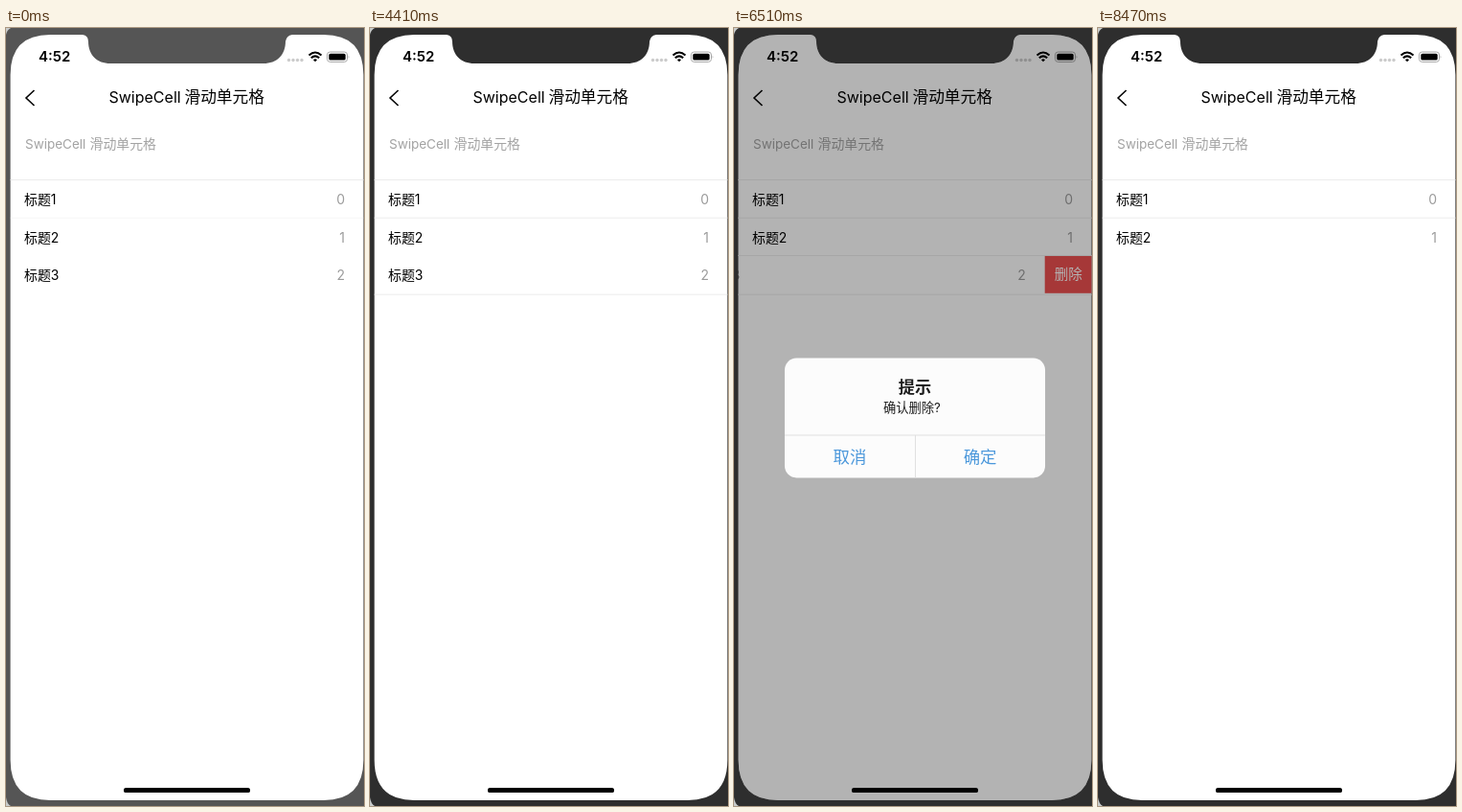
An HTML page that plays this animation: 374 px wide and 812 px high, repeating every 9660 ms.

```html
<!DOCTYPE html>
<html lang="zh-CN">
<head>
<meta charset="utf-8">
<title>SwipeCell</title>
<style>
html, body { margin: 0; width: 100%; height: 100%; overflow: hidden; background: #2e2e2e; }
svg { display: block; width: 374px; height: 812px; }
text { font-family: Inter, "Noto Sans CJK SC", "Noto Sans CJK", sans-serif; }
.mid { text-anchor: middle; }
.end { text-anchor: end; }
.label { fill: #fff; font-size: 14.6px; text-anchor: middle; }
.action { fill: #4a98dd; font-size: 17px; text-anchor: middle; }
.line { stroke: #ececec; }
</style>
</head>
<body>
<svg viewBox="0 0 374 812">
  <defs>
    <path id="shape" d="M46 7H80Q86 8 86 14C86 28 95 37 109 37H269C283 37 292 28 292 14Q293 8 299 7H332Q373.4 7 373.4 49V764Q373.4 806 332 806H46Q4.6 806 4.6 764V49Q4.6 7 46 7Z"/>
    <clipPath id="screen"><use href="#shape"/></clipPath>
  </defs>
  <rect id="bezel" width="374" height="812"/>
  <path d="M0 0H5Q1 2 0 7ZM0 803Q1 810 5 812H0Z" fill="#c9cccb"/>
  <use href="#shape" fill="#fff"/>
  <g clip-path="url(#screen)">
    <text x="34" y="35.3" font-size="15" font-weight="600">4:52</text>
    <g fill="#cbcbcb">
      <circle cx="295.5" cy="33.5" r="1.7"/><circle cx="300" cy="33.5" r="1.7"/>
      <circle cx="304.5" cy="33.5" r="1.7"/><circle cx="309" cy="33.5" r="1.7"/>
    </g>
    <g fill="none" stroke="#000" stroke-width="2">
      <path d="M316.5 28.5Q323 22.5 329.5 28.5M318.8 31.3Q323 27.5 327.2 31.3"/>
      <path d="M321 33.2Q323 31.4 325 33.2L323 35.3Z" fill="#000" stroke="none"/>
    </g>
    <rect x="335.5" y="25" width="21" height="10.4" rx="3" fill="none" stroke="#a8a8a8"/>
    <rect x="337.3" y="26.8" width="17.4" height="6.8" rx="1.6"/>
    <path d="M357.6 28.5Q359.4 30.2 357.6 32Z" fill="#a8a8a8"/>
    <path d="M29.5 65L21 73L29.5 81" fill="none" stroke="#000" stroke-width="1.6"/>
    <text y="78.3"><tspan x="107.5" font-size="16">SwipeCell</tspan><tspan x="186.5" font-size="16.7">滑动单元格</tspan></text>
    <text y="125.6" fill="#a3a3a3"><tspan x="20" font-size="13.5">SwipeCell</tspan><tspan x="87.5" font-size="13.9">滑动单元格</tspan></text>
    <g id="rows"></g>
    <path class="line" d="M4 158.5H374"/>
    <path class="line" id="line1" d="M4 198.2H374"/>
    <path class="line" id="line2" d="M4 237.5H374"/>
    <path class="line" id="line3" d="M4 278.2H374"/>
    <rect x="123" y="793.3" width="132" height="4.8" rx="2.4"/>
    <rect id="dim" width="374" height="812"/>
    <rect id="bar" x="123" y="793.3" width="132" height="4.8" rx="2.4"/>
    <g id="dialog">
      <rect x="56" y="346" width="266" height="122" rx="12" fill="#fff"/>
      <path id="press" d="M189.5 425H322V456A12 12 0 0 1 310 468H189.5Z" fill="#ebebeb"/>
      <path d="M56 424.5H322M189.5 424.5V468" stroke="#e2e2e2"/>
      <text class="mid" x="189" y="381.6" font-size="16.8" font-weight="600" fill="#1a1a1a">提示</text>
      <text class="mid" x="186" y="401.5" font-size="13" fill="#1a1a1a">确认删除?</text>
      <text class="action" x="122.5" y="453">取消</text>
      <text class="action" x="255.5" y="453">确定</text>
    </g>
  </g>
</svg>
<script>
const LOOP = 9660, STEP = 70, CELL = 49.3;
const $ = id => document.getElementById(id);

const button = (i, y, label, color, width) =>
  `<rect x="${374 + i * CELL}" y="${y}" width="${width}" height="39.4" fill="${color}"/>
   <text class="label" x="${374 + (i + 0.5) * CELL}" y="${y + 25}">${label}</text>`;

const row = (i, withFavorite) => {
  const y = 158.8 + i * 39.3;
  const favorite = withFavorite ? button(0, y, "收藏", "#e2e2e2", CELL) : "";
  // The last button runs on to the right so a pull past its edge stays filled
  const remove = button(withFavorite ? 1 : 0, y, "删除", "#ec5050", 200);
  return `<g><text x="19" y="${y + 25.6}" font-size="13.9">标题${i + 1}</text>
    <text class="end" x="354" y="${y + 25.6}" font-size="14" fill="#9c9c9c">${i}</text>${favorite}${remove}</g>`;
};

$("rows").innerHTML = row(0, true) + row(1, false) + row(2, false);
const rows = [...$("rows").children];

const ease = (t, from, to, power = 3) => {
  const p = Math.min(1, Math.max(0, (t - from) / (to - from)));
  return 1 - (1 - p) ** power;
};
const show = (el, on) => el.setAttribute("visibility", on ? "visible" : "hidden");

function offsets(t) {
  const first = 2 * CELL * (ease(t, 1470, 1820, 4) - ease(t, 2730, 3150));
  const second = CELL * (ease(t, 2730, 3150) - ease(t, 3990, 4410));
  const pull = t < 4690 ? 0 : CELL + 7 * (1 - ease(t, 4760, 5040));
  return [first, second, pull * (1 - ease(t, 7980, 8190))];
}

function draw(time) {
  const t = Math.floor((time % LOOP) / STEP) * STEP;
  const focused = t >= 1330;
  $("bezel").setAttribute("fill", focused ? "#2e2e2e" : "#555");

  offsets(t).forEach((x, i) => rows[i].setAttribute("transform", `translate(${-x} 0)`));
  show(rows[2], t < 8470);
  $("line1").setAttribute("opacity", focused ? 1 : 0.45);
  show($("line2"), t >= 4690 && t < 8050);
  show($("line3"), focused && t < 8050);

  const since = Math.max(0, t - 6400);
  const alpha = (1 - Math.exp(-since / 30)) * (1 - ease(t, 7420, 7770, 1.5));
  const scale = 1 + 0.143 * Math.exp(-since / 60);
  $("dim").setAttribute("opacity", 0.305 * alpha);
  $("dialog").setAttribute("opacity", alpha);
  $("dialog").setAttribute("transform", `translate(189 407) scale(${scale}) translate(-189 -407)`);
  $("press").setAttribute("opacity", t >= 7280 && t < 7350 ? 1 : 0);
}

const start = performance.now();
function tick() {
  draw(performance.now() - start);
  requestAnimationFrame(tick);
}
tick();
</script>
</body>
</html>
```
